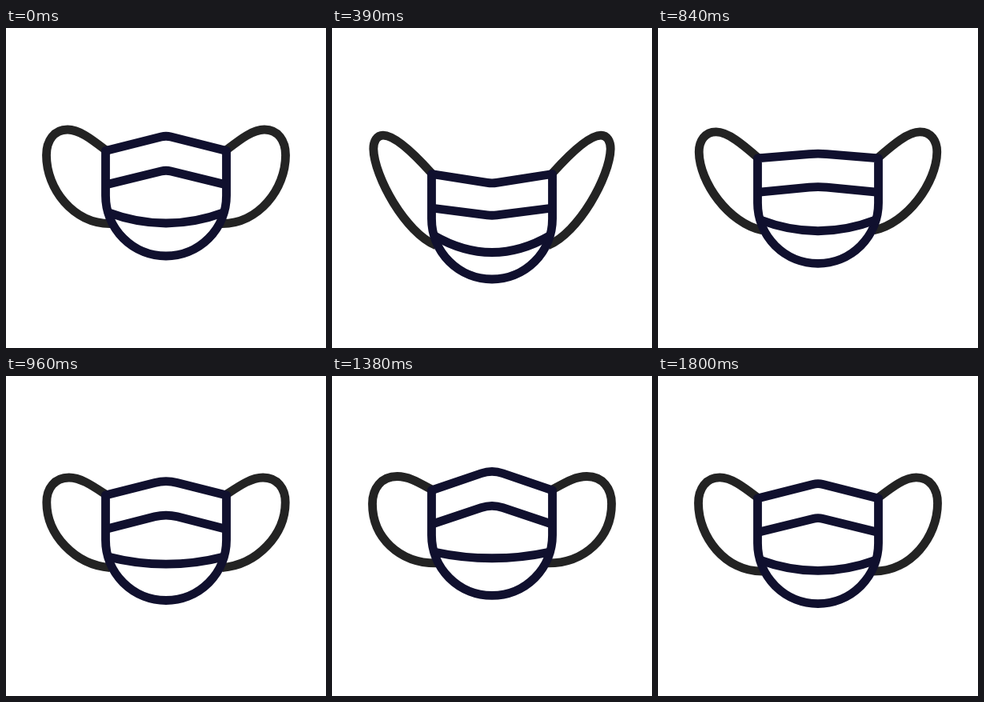
Recreate the animation shown at these times as an HTML page with a canvas. Size 400 by 400 pixels, loop 1830 ms.

```html
<!DOCTYPE html>
<html lang="en">
<head>
<meta charset="utf-8">
<title>Face mask</title>
<style>
  html, body { margin: 0; width: 100%; height: 100%; overflow: hidden; background: #fff; }
  canvas { display: block; width: 400px; height: 400px; }
</style>
</head>
<body>
<canvas id="stage" width="400" height="400"></canvas>
<script>
const ctx = document.getElementById('stage').getContext('2d');
const LOOP = 1830, STEP = 30;
const MID = 200, HALF = 75.5;

// top: corner height, fold: tip offset, round: tip rounding, sag: seam depth,
// crownX/crownY: highest strap point, sideY: outermost strap point, lean: strap slant.
const rest = { top: 153.5, fold: -19, round: 6, sag: 13.5, crownX: 77, crownY: 127, sideY: 159, lean: 0 };
const down = { top: 186.5, fold: 16, round: 6, sag: 22, crownX: 62, crownY: 135, sideY: 150, lean: 1 };
const up = { top: 139.5, fold: -28, round: 16, sag: 6, crownX: 83, crownY: 125, sideY: 160, lean: 0 };

// m0 and m1 are the speeds at the start and end of a phase.
const phases = [
  { from: rest, to: down, start: 0, end: 551, m0: 1.41, m1: 0 },
  { from: down, to: up, start: 551, end: 1126, m0: 0, m1: 0 },
  { from: up, to: rest, start: 1126, end: LOOP, m0: 0, m1: 0.62 }
];

const mix = (a, b, p) => a + (b - a) * p;

function ease(s, m0, m1) {
  const s2 = s * s, s3 = s2 * s;
  return 3 * s2 - 2 * s3 + m0 * (s3 - 2 * s2 + s) + m1 * (s3 - s2);
}

function poseAt(t) {
  const { from, to, start, end, m0, m1 } = phases.find(ph => t < ph.end);
  const p = ease((t - start) / (end - start), m0, m1);
  const pose = {};
  for (const key in from) pose[key] = mix(from[key], to[key], p);
  return pose;
}

// Strap from the upper corner over the crown, round the side and back under the mask.
function strap({ top, crownX, crownY, sideY, lean }, flip) {
  const rootX = MID - HALF, rootY = top - 1;
  const sideX = 50.5 + 1.5 * lean;
  const tailX = 130, tailY = top + 91 - 2 * lean;
  ctx.save();
  if (flip) {
    ctx.translate(2 * MID, 0);
    ctx.scale(-1, 1);
  }
  ctx.beginPath();
  ctx.moveTo(rootX, rootY);
  ctx.bezierCurveTo(mix(rootX, crownX, 0.35), mix(rootY, crownY, 0.5),
                    crownX + 15, crownY, crownX, crownY);
  ctx.bezierCurveTo(mix(crownX, sideX, 0.65), crownY,
                    sideX, mix(sideY, crownY, 0.56), sideX, sideY);
  ctx.bezierCurveTo(sideX + lean, sideY + 42 - 8 * lean,
                    tailX - 46 + 9 * lean, tailY - 18 * lean, tailX, tailY);
  ctx.stroke();
  ctx.restore();
}

// Chevron from the left edge to the right edge with a rounded tip.
function chevron(y, rise, round) {
  const near = y + rise * (1 - round / HALF);
  ctx.lineTo(MID - HALF, y);
  ctx.lineTo(MID - round, near);
  ctx.quadraticCurveTo(MID, y + rise, MID + round, near);
  ctx.lineTo(MID + HALF, y);
}

function draw(t) {
  const pose = poseAt(t);
  const { top, fold, round, sag, lean } = pose;
  ctx.fillStyle = '#fff';
  ctx.fillRect(0, 0, 400, 400);
  ctx.lineWidth = 10.8;
  ctx.lineJoin = 'round';

  ctx.strokeStyle = '#232323';
  strap(pose, false);
  strap(pose, true);

  ctx.strokeStyle = '#10102e';
  ctx.beginPath();
  chevron(top, fold, round);
  ctx.arc(MID, top + 56, HALF, 0, Math.PI);
  ctx.closePath();
  ctx.stroke();

  ctx.beginPath();
  chevron(top + 42.5, fold + 0.5 - 3 * lean, round);
  ctx.stroke();

  const seam = top + 77;
  ctx.beginPath();
  ctx.moveTo(MID - 72.5, seam);
  ctx.quadraticCurveTo(MID, seam + 2 * sag, MID + 72.5, seam);
  ctx.stroke();
}

const begin = performance.now();
function tick() {
  const t = (performance.now() - begin) % LOOP;
  draw(Math.floor(t / STEP) * STEP);
  requestAnimationFrame(tick);
}
tick();
</script>
</body>
</html>
```
